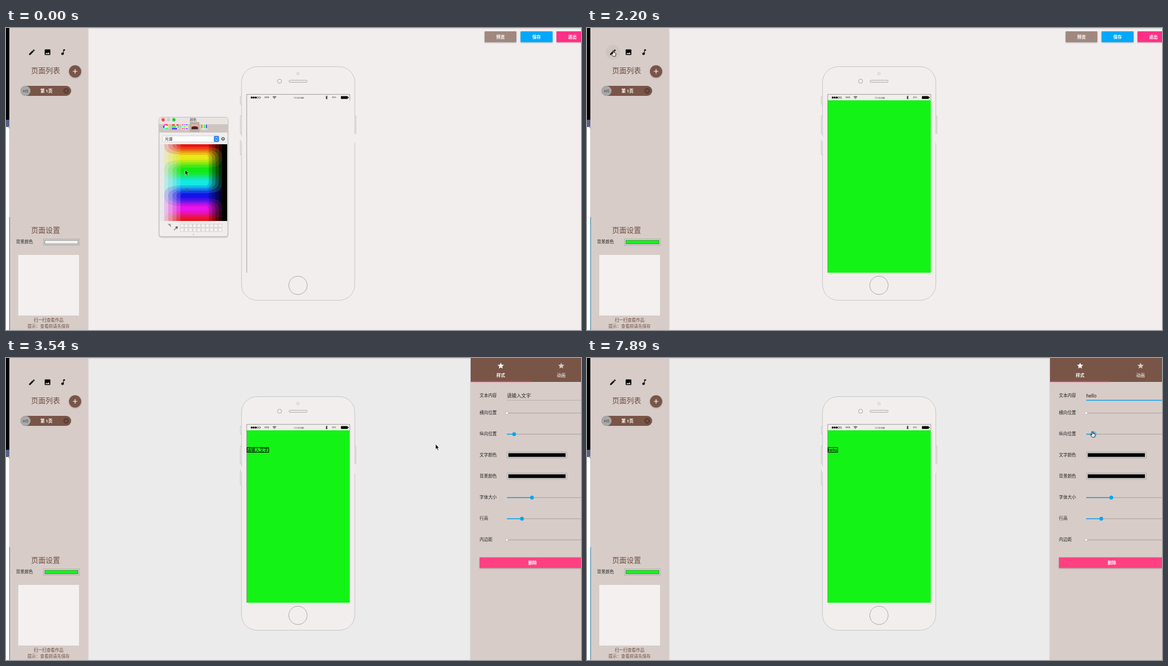
Animation of 1032 by 543 pixels, one loop 8 s. Source, as an HTML page with a canvas:

```html
<!DOCTYPE html>
<html lang="zh">
<head>
<meta charset="utf-8">
<style>
  html, body { margin: 0; width: 100%; height: 100%; overflow: hidden; background: #f1eeed; }
  svg { display: block; width: 1032px; height: 543px; }
  text { font-family: Roboto, "Noto Sans CJK SC", "Noto Sans CJK", sans-serif; white-space: pre; }
  canvas { display: block; }
  .shadow { filter: drop-shadow(0 1px 1px #0004); }
</style>
</head>
<body>
<svg id="stage" viewBox="0 0 1032 543"></svg>
<script>
const LOOP = 8000, GREEN = '#13f416', BROWN = '#795548', INK = '#6d4c41', SAND = '#d7ccc8', BLUE = '#08a4ee', PAPER = '#f1eeed';
const $ = id => document.getElementById(id);
const range = n => [...Array(n).keys()];

// Markup helpers; text is placed by its vertical centre.
const rect = (x, y, w, h, fill, more = '') => `<rect x="${x}" y="${y}" width="${w}" height="${h}" fill="${fill}" ${more}/>`;
const circle = (x, y, r, fill, more = '') => `<circle cx="${x}" cy="${y}" r="${r}" fill="${fill}" ${more}/>`;
const path = (d, fill, more = '') => `<path d="${d}" fill="${fill}" ${more}/>`;
const line = (d, color, width = 1, more = '') => path(d, 'none', `stroke="${color}" stroke-width="${width}" ${more}`);
const text = (x, cy, size, str, fill = '#222', more = '') =>
  `<text x="${x}" y="${cy + size * .37}" font-size="${size}" fill="${fill}" ${more}>${str}</text>`;
const MID = 'text-anchor="middle"', BOLD = MID + ' font-weight="700"';

const ICONS = {
  pencil: 'M3 17.25V21h3.75L17.8 9.94l-3.75-3.75zM20.7 7.04a1 1 0 0 0 0-1.41l-2.34-2.34a1 1 0 0 0-1.41 0l-1.83 1.83 3.75 3.75z',
  image: 'M21 19V5a2 2 0 0 0-2-2H5a2 2 0 0 0-2 2v14a2 2 0 0 0 2 2h14a2 2 0 0 0 2-2zM8.5 13.5l2.5 3 3.5-4.5 4.5 6H5z',
  note: 'M12 3v10.55A4 4 0 1 0 14 17V7h4V3z',
  star: 'M12 17.3L18.2 21l-1.7-7L22 9.2l-7.2-.6L12 2 9.2 8.6 2 9.2 7.5 14l-1.7 7z'
};
const icon = (name, x, y, fill = '#000') =>
  path(ICONS[name], fill, `transform="translate(${x - 6.7} ${y - 6.7}) scale(.56)"`);

const colorInput = (x, y, w, fill, id = '') =>
  rect(x, y, w, 11, '#f8f6f5', 'stroke="#a5a09e" stroke-width="1"') +
  rect(x + 2, y + 2, w - 4, 7, fill, `stroke="#777" stroke-width="1" id="${id}"`);

const button = (x, y, w, h, fill, label) =>
  rect(x, y, w, h, fill, 'rx="1" class="shadow"') + text(x + w / 2, y + h / 2, 7.7, label, '#fff', BOLD);

const desktopEdge = () =>
  rect(0, 0, 6, 166, '#000') + rect(0, 165, 6, 12, '#586288') + rect(0, 177, 6, 366, '#fff') +
  line('M0 177.5h4q2 0 2 3', '#333', .8) + line('M6.5 177V340', '#bbb', .7) + line('M6.5 340V543', '#2a7a9c');

const sidebar = () =>
  rect(6, 0, 142, 543, SAND) + line('M148 0V543', '#e6e0dd') + line('M148 .3H1032', '#c9c6c5') +
  circle(46.5, 43.5, 13, '#cfc4c0', 'id="hover"') +
  icon('pencil', 46.5, 43.5) + icon('image', 74.5, 43.5) + icon('note', 102.6, 43.5) +
  text(45, 76, 13, '页面列表', INK) +
  circle(124, 78, 11, BROWN, 'class="shadow"') + line('M120 78h8M124 74v8', '#fff', 1.2) +
  rect(26, 104, 91, 18, BROWN, 'rx="9"') + circle(35, 113, 9, '#a8a8a8') + text(35, 113, 7.5, 'H5', '#444', MID) +
  text(72.5, 113, 7.7, '第 1页', '#fff', BOLD) +
  circle(108, 113, 5.2, '#5b4037') + line('M106 111l4 4m0-4l-4 4', '#8f6d61', .9) +
  text(45, 363.5, 13, '页面设置', INK) + text(18, 384.5, 7.6, '背景颜色') +
  colorInput(67.5, 379.5, 64, PAPER, 'pageColor') +
  rect(22, 408, 109, 109, '#f3f0ef') +
  text(76.5, 525, 7.6, '扫一扫查看作品', INK, MID) + text(76.5, 536.5, 7.6, '提示：查看前请先保存', INK, MID);

const phone = () => {
  const outline = 'stroke="#aaa" stroke-width=".6"';
  return [[420.5, 123, 14], [420.5, 158, 32], [420.5, 201, 27], [625, 158, 32]]
      .map(([x, y, h]) => rect(x, y, 3, h, PAPER, 'rx="1" ' + outline)).join('') +
    rect(422.7, 69.5, 203.3, 420, '#f2eeed', 'rx="28" ' + outline) +
    line('M422.7 195v9M626 190v17', '#f5f2f1', 1.6) +
    circle(524, 82, 2.3, 'none', outline) + circle(491, 95.7, 3.7, 'none', 'stroke="#888" stroke-width=".7"') +
    rect(508, 94, 32.5, 3.6, 'none', 'rx="1.8" stroke="#888" stroke-width=".7"') +
    circle(524, 462.7, 16.5, 'none', 'stroke="#888" stroke-width=".7"') +
    rect(432, 130, 185, 310, GREEN, 'id="screen"') +
    line('M432 440V119.3H617V130', '#777', .7) +
    range(5).map(i => circle(441 + i * 3.6, 125, 1.5, i < 3 ? '#000' : 'none', 'stroke="#000" stroke-width=".5"')).join('') +
    text(464, 125, 3.4, 'DATA') +
    line('M478.5 124q3.3-2 6.6 0M480 125.5q1.8-1.2 3.6 0', '#222', 1) + circle(481.8, 126.8, .6, '#222') +
    text(525.5, 125, 4.2, '12:30 AM', '#333', MID) +
    line('M573.7 123.5l3.2 3-1.6 1.5v-6l1.6 1.5-3.2 3', '#000', .8) + text(585, 125, 4, '42%', '#333') +
    rect(601, 122.5, 12.5, 5, '#000', 'rx="1"') + rect(614, 124, 1, 2, '#000') +
    text(432.4, 164.7, 7.6, '', '#000', 'id="label"') +
    rect(432.5, 161, 10, 8.5, 'none', 'id="labelBox" stroke="#000" stroke-width="1"');
};

const slider = (y, value) =>
  line(`M65 ${y}H216`, '#b6adaa', 1.3) + (value
    ? line(`M65 ${y}h${value}`, BLUE, 1.5) + circle(65 + value, y, 3.4, BLUE)
    : circle(65, y, 2.4, '#fff', 'stroke="#aaa" stroke-width=".8"'));

const panel = () => '<g id="panel">' +
  rect(0, 0, 216, 543, SAND, 'class="shadow"') + rect(0, 0, 216, 43, BROWN) + rect(0, 41.5, 108, 1.7, '#f52f72') +
  icon('star', 54, 14, '#fff') + text(54, 31, 7.7, '样式', '#fff', BOLD) +
  icon('star', 162.5, 14, '#d4c7c2') + text(162.5, 31, 7.7, '动画', '#d9cec9', BOLD) +
  ['文本内容', '横向位置', '纵向位置', '文字颜色', '背景颜色', '字体大小', '行高', '内边距']
    .map((name, i) => text(16, i ? 60 + i * 38.05 : 67, 7.7, name)).join('') +
  rect(65, 62, 0, 11, '#add1fb', 'id="selection"') + text(65, 67.5, 8.6, '', '#222', 'id="field"') +
  line('M65 76H216', '#b6adaa', 1, 'id="underline"') +
  slider(99, 0) + slider(137, 13) + slider(251, 45) + slider(289, 27) + slider(327, 0) +
  circle(78, 137, 6, BLUE, 'opacity=".35" id="thumbHover"') +
  colorInput(65.5, 169, 107, '#000') + colorInput(65.5, 207, 107, '#000') +
  button(16, 358.5, 190, 19, '#ff4081', '删除') + '</g>';

const picker = () => {
  const hues = range(6).map(i => `hsl(${i * 60} 90% 60%)`);
  return '<g id="picker">' +
    rect(275, 160.5, 123, 214.5, '#f0eded', 'rx="4" stroke="#b5b0ae" stroke-width=".7" class="shadow"') +
    path('M275 188v-23q0-4 4-4h115q4 0 4 4v23z', '#e9e4e2') + rect(275, 173, 123, 15, '#cfc5c0') +
    circle(282, 165, 2.9, '#fc4b48') + circle(291.5, 165, 2.9, '#d0c9c6') + circle(301.3, 165, 2.9, '#14d03c') +
    text(336, 165, 6, '颜色', '#333', MID) +
    rect(330, 169, 17, 18, '#b9adaa') +
    circle(287, 177.5, 5.5, '#f4f0ef') +
    hues.map((c, i) => line('M287 173.5a4 4 0 0 1 3.46 2', c, 2.4, `transform="rotate(${i * 60} 287 177.5)"`)).join('') +
    range(3).map(i => rect(298, 173 + i * 3.4, 11.5, 2.5, hues[i * 2]) + rect(303 + i * 2, 173 + i * 3.4, 3, 2.5, '#f0eded')).join('') +
    rect(315.5, 172, 11, 11, '#f5f2f1') + range(9).map(i => circle(317.5 + i % 3 * 3.5, 174 + (i / 3 | 0) * 3.5, 1.2, hues[i * 5 % 6])).join('') +
    rect(333, 173, 11.5, 9, '#e9b0a0') + path('M333 178q5-3 11.5 0v4H333z', '#452828') +
    rect(350, 172.5, 11.5, 10, '#eee') + range(5).map(i => rect(350.7 + i * 2.1, 173.5, 1.7, 7, hues[i])).join('') +
    rect(281, 194, 101, 11, '#fdfcfc', 'rx="2" stroke="#c4bfbd" stroke-width=".7"') + rect(373, 194, 9.3, 11, '#2f8df3', 'rx="2"') +
    line('M375.8 198.3l1.9-2 1.9 2M375.8 200.8l1.9 2 1.9-2', '#fff', .9) + text(285, 199.5, 7, '光谱') +
    circle(389.5, 199.3, 2, 'none', 'stroke="#555" stroke-width="1.3"') +
    circle(389.5, 199.3, 3.1, 'none', 'stroke="#555" stroke-width="1" stroke-dasharray="1.2 1.23"') +
    '<foreignObject x="276" y="209" width="121" height="138"><canvas id="spectrum" width="121" height="138"></canvas></foreignObject>' +
    circle(325, 291, 2.5, 'none', 'id="ring" stroke="#467" stroke-width=".8"') +
    path('M290 352h3q3 0 3 3v3z', '#999') + rect(281, 352, 15, 15, '#2ced2e', 'rx="3" id="swatch"') +
    line('M301.5 363.5l4-4', '#888', 1.6) + line('M304.5 357.5l3 3M306 359l2-2', '#555', 2) +
    range(20).map(i => rect(312.8 + i % 10 * 7.6, 352.4 + (i / 10 | 0) * 7.4, 6.2, 6.2, '#f5f3f2', 'stroke="#c9c4c2" stroke-width=".7"')).join('') +
    circle(336.5, 371, .7, '#888') + '</g>';
};

const pointers = () =>
  `<g id="arrow">${path('M0 0v9.2l2.1-1.9 1.6 3.4 1.5-.7-1.6-3.3H6.4z', '#000', 'stroke="#fff" stroke-width=".6"')}</g>` +
  `<g id="hand">${path('M-.8 0q.9-.7 1.7.2v3l3.2.8q1.1.5.8 2l-.9 3.8H-.3l-3.4-3.9q0-1.3 1.6-.5l1.3 1z', '#fff', 'stroke="#000" stroke-width=".8"')}</g>` +
  `<g id="ibeam">${line('M-1.8-4.5q1.8 0 1.8 1.2 0-1.2 1.8-1.2M0-3.5v7M-1.8 4.5q1.8 0 1.8-1.2 0 1.2 1.8 1.2', '#222', .9)}</g>`;

$('stage').innerHTML = rect(0, 0, 1032, 543, PAPER, 'id="back"') + phone() +
  button(859, 6, 57, 19.5, '#a1887f', '预览') + button(923.5, 6, 57.5, 19.5, '#00a8fb', '保存') + button(988, 6, 57, 19.5, '#ff3186', '退出') +
  sidebar() + panel() + desktopEdge() + picker() + pointers();

// Posterised spectrum: white to hue to black across, hue down, with wide bands around the pure hues.
function paintSpectrum() {
  const g = $('spectrum').getContext('2d'), clamp = v => Math.min(1, Math.max(0, v));
  for (let y = 0; y < 138; y++) for (let x = 0; x < 121; x++) {
    const tint = clamp((x - 4) / 36), bright = clamp((114 - x) / 30);
    const rgb = [0, 4, 2].map(shift => {
      const ramp = clamp(Math.abs((y / 23 + shift) % 6 - 3) - 1);
      const pure = ramp * ramp * (3 - 2 * ramp);
      const v = (1 - (1 - pure) * tint) * bright;
      return (Math.round(v * 5) / 5 * 212 + 20 * bright) | 0;
    });
    g.fillStyle = `rgb(${rgb})`;
    g.fillRect(x, y, 1, 1);
  }
}
paintSpectrum();

// Each key holds until the next one.
const POINTER = [
  [0, 321.5, 255, 'arrow'], [1010, 346, 180, 'arrow'], [1160, 294, 84, 'arrow'], [1300, 207.5, 27.5, 'arrow'],
  [1450, 166, 27, 'arrow'], [1600, 120, 16, 'arrow'], [1750, 80, 13, 'arrow'], [1900, 57, 27, 'arrow'], [2050, 47, 41, 'hand'],
  [2500, 70, 30, 'arrow'], [2650, 190, 60, 'arrow'], [2800, 400, 130, 'arrow'], [2940, 538, 168, 'arrow'],
  [3090, 495, 170, 'arrow'], [3240, 461, 166, 'hand'], [3540, 771, 155, 'arrow'], [3690, 850, 110, 'arrow'],
  [3840, 900, 82, 'arrow'], [3990, 930, 69, 'ibeam'], [4150, 943, 67, 'ibeam'], [4450, 920, 67, 'ibeam'],
  [4600, 885, 67, 'ibeam'], [4750, 862, 67, 'ibeam'], [6850, 840, 75, 'arrow'], [7000, 740, 110, 'arrow'],
  [7150, 668, 140, 'arrow'], [7300, 700, 146, 'arrow'], [7450, 790, 143, 'arrow'], [7590, 880, 138, 'arrow'],
  [7740, 918, 134, 'arrow'], [7890, 907, 132.5, 'hand']
];
const WORDS = [[0, ''], [2350, '请输入文字'], [5350, ''], [5500, 'h'], [5950, 'he'], [6100, 'hel'], [6400, 'hello']];
const PANEL_X = [[0, 1060], [3390, 890], [3540, 834], [3690, 831]];
const at = (keys, t) => keys.filter(k => k[0] <= t).pop();
const set = (id, name, value) => $(id).setAttribute(name, value);
const show = (id, on) => set(id, 'visibility', on ? 'visible' : 'hidden');

function render(t) {
  const [, x, y, kind] = at(POINTER, t), word = at(WORDS, t)[1], panelX = at(PANEL_X, t)[1];
  const colored = t >= 150, editing = t >= 3390, focused = t >= 4450;

  set('screen', 'fill', colored ? GREEN : '#f2eeed');
  set('pageColor', 'fill', colored ? GREEN : PAPER);
  show('swatch', colored && t < 720);
  show('ring', !colored);
  show('picker', t < 720);
  set('picker', 'opacity', t < 570 ? 1 : .75);
  $('spectrum').style.visibility = t < 720 ? 'visible' : 'hidden';

  set('back', 'fill', editing ? '#ebebeb' : PAPER);
  $('label').textContent = $('field').textContent = word;
  show('labelBox', editing);
  set('labelBox', 'width', $('label').getComputedTextLength() + 1);
  show('panel', editing);
  set('panel', 'transform', `translate(${panelX})`);
  set('underline', 'stroke', focused ? BLUE : '#b6adaa');
  set('underline', 'stroke-width', focused ? 1.5 : 1);

  const from = Math.max(65, x - panelX);
  set('selection', 'x', from);
  set('selection', 'width', focused && t < 5350 ? Math.max(0, 108 - from) : 0);
  show('hover', t >= 2050 && t < 2500);
  show('thumbHover', t >= 7740);

  for (const id of ['arrow', 'hand', 'ibeam']) show(id, id === kind);
  set(kind, 'transform', `translate(${x} ${y})`);
}

function tick() {
  render(performance.now() % LOOP);
  requestAnimationFrame(tick);
}
tick();
</script>
</body>
</html>
```
